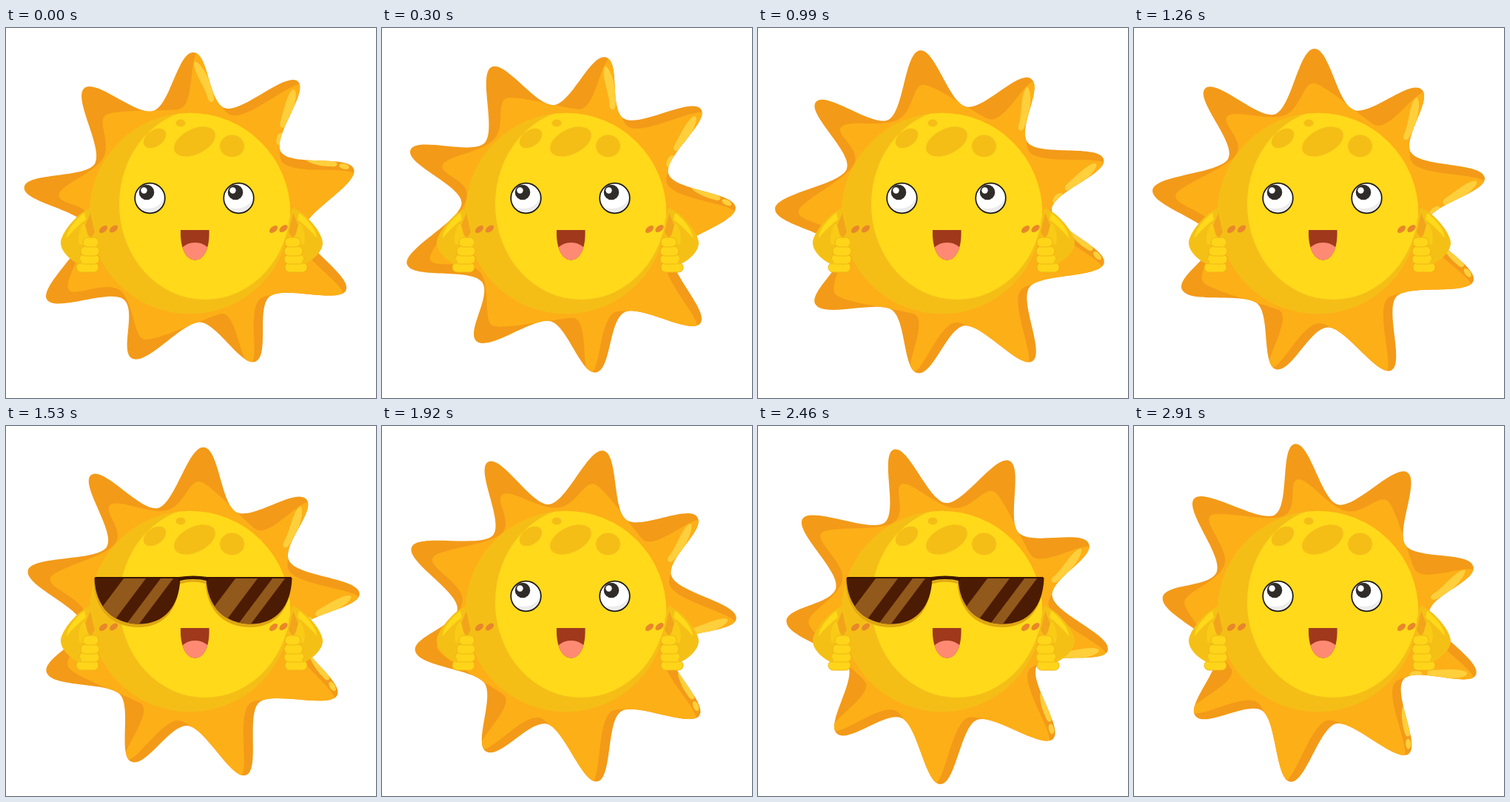
Animation, 500 px wide and 500 px high, one loop 2940 ms. Source, as an HTML page:

```html
<!DOCTYPE html>
<html lang="en">
<head>
<meta charset="utf-8">
<title>Spinning sun</title>
<style>
  html, body { margin: 0; width: 100%; height: 100%; overflow: hidden; background: #fff; }
  svg { display: block; width: 100%; height: 100%; }
</style>
</head>
<body>
<svg viewBox="0 0 500 500">
  <defs>
    <clipPath id="starClip"><path class="starShape"/></clipPath>
    <clipPath id="faceClip"><circle cx="248.500" cy="250.500" r="135.800"/></clipPath>
    <clipPath id="mouthClip"><use href="#mouth"/></clipPath>
    <clipPath id="eyeClip"><circle r="20"/></clipPath>
    <path id="mouth" d="M236 273H274.500C275.500 297 268 313.500 255.500 313.500S235 297 236 273Z"/>
    <path id="lens" d="M121.500 204H233Q235.500 204 235.500 206C234 244 214 267.500 180 267.500S121 246 119.500 206Q119.500 204 121.500 204Z"/>
    <clipPath id="lensClip"><use href="#lens"/></clipPath>

    <g id="arm">
      <path fill="#f5c016" d="M115 243C96 249 73 279 74 291C75 304 88 313 97 316L121 311L120 262Z"/>
      <path fill="#ffd91a" d="M106 250C94 258 82 274 82 284C88 276 98 266 108 259Z"/>
      <path fill="#f2a51b" d="M114 250L105 272L115 284L120 276Z"/>
      <path fill="#f9cb17" d="M103 266C99 273 97 282 99 292L112 294C111 284 110 274 107 267Q105 263 103 266Z"/>
      <g fill="#ffd51a" stroke="#f0b514" stroke-width="1">
        <rect x="95" y="317" width="30" height="13" rx="6.500"/>
        <rect x="99" y="306" width="27" height="13" rx="6.500"/>
        <rect x="101" y="295" width="25" height="13" rx="6.500"/>
        <rect x="104" y="283" width="21" height="13" rx="6.500"/>
      </g>
      <path fill="#f5c016" d="M80 292C86 304 94 310 102 314L101 320C90 316 78 306 76 296Z"/>
    </g>

    <g id="eye">
      <circle r="20.300" fill="#fff"/>
      <path clip-path="url(#eyeClip)" fill="#ececec" d="M20-8C20 8 6 17-12 13L-4 24H24Z"/>
      <circle r="20.300" fill="none" stroke="#1c1714" stroke-width="1.700"/>
      <circle cx="-4.500" cy="-8" r="10.300" fill="#302c2a"/>
      <circle cx="-8" cy="-10.500" r="4.200" fill="#fff"/>
    </g>

    <g id="lensPair">
      <use href="#lens" x="-1" y="4.500" fill="#dfa612"/>
      <use href="#lens" fill="#4b1b03"/>
      <g clip-path="url(#lensClip)" fill="#91591b">
        <path d="M159 206H189L141 270H111Z"/>
        <path d="M209 206H226L178 270H161Z"/>
      </g>
    </g>
  </defs>

  <g id="star">
    <path class="starShape" fill="#f39a18"/>
    <path id="lit" fill="#fdaf17" clip-path="url(#starClip)"/>
    <g fill="#ffcf3c" clip-path="url(#starClip)">
      <path d="M255 45C265 47 280 76 281 96C280 102 275 101 273 96C270 80 250 56 255 45Z"/>
      <path d="M389 83C396 86 388 118 379 132C374 138 368 134 371 126C375 112 381 84 389 83Z"/>
      <ellipse cx="370" cy="150" rx="4.500" ry="8.500" transform="rotate(12 370 150)"/>
      <path d="M404 176C415 173 440 177 447 182C449 187 443 188 438 187C424 187 405 182 404 176Z"/>
      <ellipse cx="457" cy="187" rx="7" ry="3.600" transform="rotate(14 457 187)"/>
    </g>
  </g>

  <g clip-path="url(#faceClip)">
    <rect width="500" height="500" fill="#f5be17"/>
    <ellipse cx="269" cy="238" rx="116" ry="129" fill="#ffd91a"/>
  </g>
  <g fill="#f5be17">
    <ellipse cx="201" cy="149" rx="17" ry="11" transform="rotate(-35 201 149)"/>
    <ellipse cx="236" cy="128.500" rx="6.500" ry="5"/>
    <ellipse cx="255" cy="153.500" rx="30" ry="17" transform="rotate(-26 255 153.500)"/>
    <ellipse cx="305.500" cy="159.500" rx="16.500" ry="15"/>
  </g>

  <use href="#arm"/>
  <use href="#arm" transform="matrix(-1 0 0 1 502 0)"/>

  <g id="cheeks" fill="#e8872a"></g>
  <use href="#mouth" fill="#a0381c"/>
  <ellipse cx="255.500" cy="308" rx="22" ry="18" fill="#ff8a73" clip-path="url(#mouthClip)"/>

  <g id="eyes">
    <use href="#eye" x="194.500" y="230"/>
    <use href="#eye" x="314.500" y="230"/>
  </g>
  <g id="glasses">
    <path d="M234 212Q253 206 272 212" fill="none" stroke="#dfa612" stroke-width="3"/>
    <use href="#lensPair"/>
    <use href="#lensPair" x="151"/>
    <path d="M121 205H234Q253 202 272 205H385" fill="none" stroke="#3a1403" stroke-width="2"/>
    <path d="M233 207.500Q253 202.500 273 207.500" fill="none" stroke="#3a1403" stroke-width="4"/>
  </g>
</svg>
<script>
const LOOP = 2940, STEP = 30, C = 250;
const $ = id => document.getElementById(id);

// Rays and the hollows that follow them: [angle from the top in degrees, radius]
const tips = [[0.800, 217], [39, 229], [75, 228], [116.500, 234], [156.500, 219],
              [201.700, 212], [239, 227], [278.800, 228], [319.500, 222]];
const dips = [[18, 149], [56, 147], [98, 154], [137, 155], [176, 148],
              [218, 148], [262, 143], [297.500, 146], [340, 147]];

// The lit side keeps the first five rays nearly whole and shrinks the rest
const litTips = tips.map(([a, r], i) => i < 5 ? [a + 2, r] : [a - 1, r * (i < 7 ? 0.86 : 0.79)]);
const litDips = dips.map(([a, r], i) => [a + (i === 4 ? -12 : i === 8 ? 13 : 4), r - 6]);

const rad = deg => deg * Math.PI / 180;
const polar = ([deg, r], side = 0) => {
  const s = Math.sin(rad(deg)), c = Math.cos(rad(deg));
  return [C + r * s + side * c, C - r * c + side * s];
};

// Smooth closed outline: every tip and hollow is crossed at a right angle to its radius
function wavy(tips, dips, tipPull, dipPull) {
  const start = `M${polar(tips[0])}`;
  return start + tips.map((tip, i) => {
    const dip = dips[i], next = tips[(i + 1) % tips.length];
    return `C${polar(tip, tipPull)} ${polar(dip, -dipPull)} ${polar(dip)}` +
           `C${polar(dip, dipPull)} ${polar(next, -tipPull)} ${polar(next)}`;
  }).join("") + "Z";
}

document.querySelectorAll(".starShape").forEach(p => p.setAttribute("d", wavy(tips, dips, 21, 24)));
$("lit").setAttribute("d", wavy(litTips, litDips, 14, 24));

$("cheeks").innerHTML = [[131.500, 272], [145.500, 271.500], [361.500, 272], [375, 271]].map(([x, y]) =>
  `<ellipse cx="${x}" cy="${y}" rx="6.500" ry="3.800" transform="rotate(-38 ${x} ${y})"/>`).join("");

const spin = t => 22.200 * Math.pow(t / 600, 0.754);
const shaded = t => t >= 600 && (t - 600) % 930 < 390;

function draw(now) {
  const t = Math.floor((now % LOOP) / STEP) * STEP;
  $("star").setAttribute("transform", `rotate(${spin(t)} ${C} ${C})`);
  $("glasses").style.display = shaded(t) ? "" : "none";
  $("eyes").style.display = shaded(t) ? "none" : "";
}

const start = performance.now();
function tick() {
  draw(performance.now() - start);
  requestAnimationFrame(tick);
}
tick();
</script>
</body>
</html>
```
